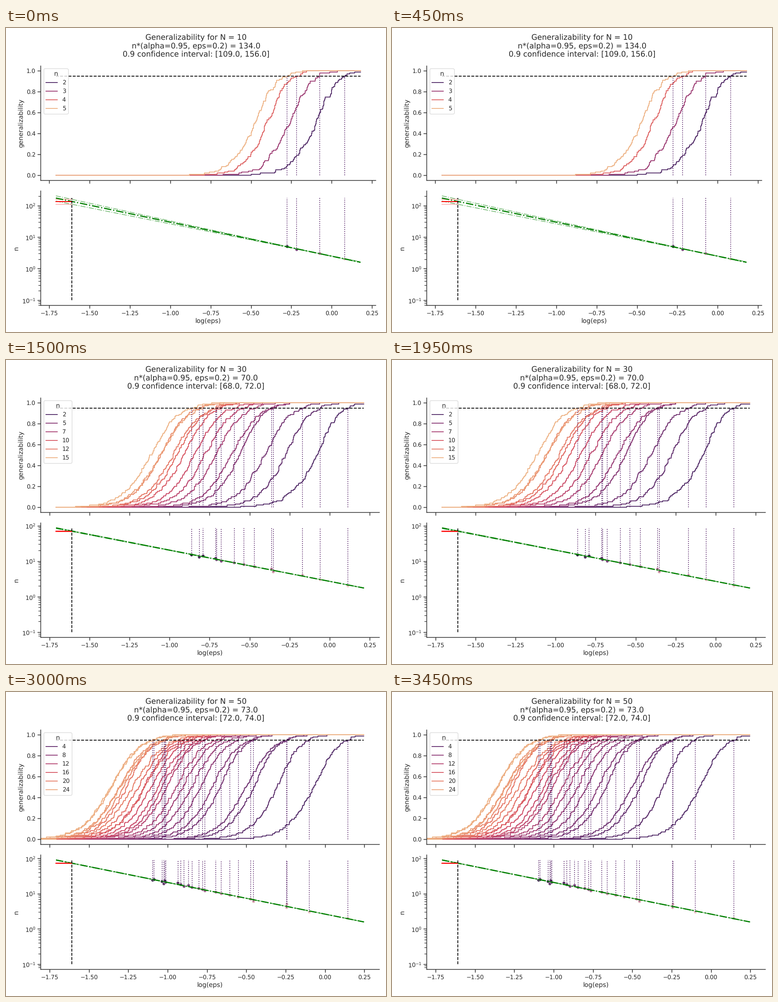
A matplotlib script that plays this animation: 837x669 px, repeating every 3.75 s.

```python
import numpy as np
import matplotlib.pyplot as plt
from matplotlib.animation import FuncAnimation
from matplotlib.colors import LinearSegmentedColormap
from matplotlib.lines import Line2D

W, H, DPI = 837, 669, 83.7
plt.rcParams.update({
    "font.family": "DejaVu Sans", "font.size": 12, "text.hinting": "none",
    "axes.labelsize": 12, "xtick.labelsize": 11, "ytick.labelsize": 11,
    "legend.fontsize": 11, "legend.title_fontsize": 12,
    "text.color": ".15", "axes.labelcolor": ".15", "axes.edgecolor": ".15",
    "xtick.color": ".15", "ytick.color": ".15",
    "axes.linewidth": 1.25, "lines.linewidth": 1.5,
    "xtick.major.size": 6, "ytick.major.size": 6, "ytick.minor.size": 4,
    "xtick.major.width": 1.25, "ytick.major.width": 1.25, "ytick.minor.width": 1,
    "axes.spines.top": False, "axes.spines.right": False,
})

FLARE = LinearSegmentedColormap.from_list("curves", [
    "#4b2362", "#6c2b6d", "#8f3371", "#b13c6c",
    "#d14a61", "#e3685c", "#e98d6b", "#edb081"])
HELIX = LinearSegmentedColormap.from_list("dots", [
    "#edd1cb", "#d9a3ae", "#b6799c", "#895587", "#593764", "#2d1e3e"])
DOTTED = "#541f66"

ALPHA = 0.95
X_EPS = np.log(0.2)
X_LEFT = X_EPS - 0.1
PIVOT = -0.1                     # where the fitted lines meet
AX_LEFT, DATA_LEFT = 76.3, 110   # pixels

# slope: decades of n lost per unit of log(eps); top: highest log10(n) plotted;
# width: spread of the curves; cross: pixel column where n = 2, 3, ... reach ALPHA.
STUDIES = [
    dict(N=10, star=134, ci=(109, 156), slope=1.077, top=2.298,
         right=0.179, edge=814.4, width=0.85, legend=range(2, 6),
         cross=[746, 691.5, 640.5, 619.5]),
    dict(N=20, star=86, ci=(82, 91), slope=0.9036, top=2.0395,
         right=0.3033, edge=822.4, width=1.45, legend=(3, 4, 6, 7, 9, 10),
         cross=[754, 684, 635, 606, 557, 543.5, 549, 505.5, 495]),
    dict(N=30, star=70, ci=(68, 72), slope=0.8784, top=1.932,
         right=0.2146, edge=822.4, width=1, legend=(2, 5, 7, 10, 12, 15),
         cross=[753, 692, 653, 588.5, 584.5, 547, 524, 502.5, 474, 463.5, 461.5,
                425.5, 434, 408.5]),
    dict(N=40, star=68, ci=(67, 69), slope=0.8659, top=1.9195,
         right=0.2357, edge=822.4, width=1, legend=range(3, 19, 3),
         cross=[753, 686.5, 639.5, 602, 551, 541, 520, 507.5, 484.5, 465.5, 461,
                462, 403, 389.5, 398, 386, 373.5, 375, 347]),
    dict(N=50, star=73, ci=(72, 74), slope=0.8977, top=1.951,
         right=0.2471, edge=822.4, width=1, legend=range(4, 25, 4),
         cross=[753, 668, 618, 618.5, 545, 538.5, 511.5, 493, 474, 462, 438, 433,
                424.5, 409.5, 392, 402, 385, 347.5, 378.5, 351.5, 343.5, 350,
                323, 326]),
]


def logit(q):
    return np.log(q / (1 - q))


def sample_steps(s, n, cross):
    """100 sorted logistic samples whose 95th lies at cross."""
    fitted = X_EPS + np.log10(s["star"] / n) / s["slope"]
    base = (fitted + cross) / 2
    spread = (0.07 + 0.009 * np.log(n / 2)) * s["width"]
    q = (np.arange(100) + 0.5) / 100
    z = logit(q)
    z = np.where(z < 0, z * (1 + 0.6 / n), z) - logit(ALPHA)
    z[z > 0] *= 0.6
    x = base + spread * z + (cross - base) * np.minimum(q / ALPHA, 1) ** 3
    rng = np.random.default_rng(100 * s["N"] + n)
    x = np.sort(x + rng.normal(0, 0.005 + 0.12 / s["N"], 100))
    x[:94] = np.minimum(x[:94], cross)
    x[94] = cross
    x[95:] = np.maximum(x[95:], cross)
    return x[x < s["right"]]


def add_axes(top, bottom, edge):
    return fig.add_axes([AX_LEFT / W, 1 - bottom / H,
                         (edge - AX_LEFT) / W, (bottom - top) / H])


def draw_curves(ax, s, ns, hue, x_cross):
    ends = [X_LEFT, s["right"]]
    for n, h, cross in zip(ns, hue, x_cross):
        x = sample_steps(s, n, cross)
        y = np.arange(len(x) + 1) / 100
        ax.plot(np.r_[X_LEFT, x, s["right"]], np.r_[y, y[-1]],
                color=FLARE(h), drawstyle="steps-post")
    ax.plot(ends, [ALPHA, ALPHA], "--", color="black")
    ax.vlines(x_cross, 0, ALPHA, color=DOTTED, ls=":")
    ax.set_ylim(-0.05, 1.05)
    ax.set_ylabel("generalizability")
    ax.tick_params(labelbottom=False)
    handles = [Line2D([], [], color=FLARE((n - 2) / (ns[-1] - 2)), label=str(n))
               for n in s["legend"]]
    ax.legend(handles=handles, title="n", loc="upper left")


def draw_fit(ax, s, ns, hue, x_cross):
    ends = np.array([X_LEFT, s["right"]])
    log_star = np.log10(s["star"])
    log_pivot = log_star - s["slope"] * (PIVOT - X_EPS)

    def line(n_eps):
        slope = (np.log10(n_eps) - log_pivot) / (PIVOT - X_EPS)
        return 10 ** (log_pivot - slope * (ends - PIVOT))

    fit = line(s["star"])
    ax.set_yscale("log")
    ax.scatter(x_cross, ns, s=36, c=HELIX(hue), edgecolors="white",
               linewidths=0.5, zorder=1)
    ax.vlines(x_cross, ns, fit[0], color=DOTTED, ls=":")
    for n in s["ci"]:
        ax.plot(ends, line(n), "-.", color="green", alpha=0.5)
        ax.plot([X_LEFT, X_EPS], [n, n], color="red", alpha=0.3)
    ax.plot(ends, fit, "-.", color="green", lw=2.2)
    ax.plot([X_LEFT, X_EPS], [s["star"]] * 2, color="red", lw=1.8)
    ax.plot([X_EPS, X_EPS], [0.1, fit[0]], "--", color="black")
    pad = 0.05 * (s["top"] + 1)
    ax.set_ylim(10 ** (-1 - pad), 10 ** (s["top"] + pad))
    ax.set_ylabel("n")
    ax.set_xlabel("log(eps)")


def draw(i):
    s = STUDIES[i]
    fig.clear()
    low, high = s["ci"]
    title = (f"Generalizability for N = {s['N']}",
             f"n*(alpha=0.95, eps=0.2) = {s['star']:.1f}",
             f"0.9 confidence interval: [{low:.1f}, {high:.1f}]")
    for k, text in enumerate(title):
        fig.text(0.5, 1 - (26 + 19 * k) / H, text, ha="center", fontsize=14.4)

    ns = np.arange(2, 2 + len(s["cross"]))
    hue = (ns - 2) / (ns[-1] - 2)
    pad = 0.05 * (s["right"] - X_LEFT)
    unit = (s["right"] - X_LEFT + 2 * pad) / (s["edge"] - AX_LEFT)
    x_cross = X_LEFT + (np.array(s["cross"]) - DATA_LEFT) * unit

    upper = add_axes(82.9, 335.3, s["edge"])
    lower = add_axes(358.4, 610.4, s["edge"])
    draw_curves(upper, s, ns, hue, x_cross)
    draw_fit(lower, s, ns, hue, x_cross)
    for ax in (upper, lower):
        ax.set_xticks(np.arange(-1.75, 0.26, 0.25))
        ax.set_xlim(X_LEFT - pad, s["right"] + pad)
    return []


fig = plt.figure(figsize=(W / DPI, H / DPI), dpi=DPI, facecolor="white")
anim = FuncAnimation(fig, draw, frames=len(STUDIES), init_func=lambda: [],
                     interval=750, repeat=True, repeat_delay=0)
plt.show()
```
